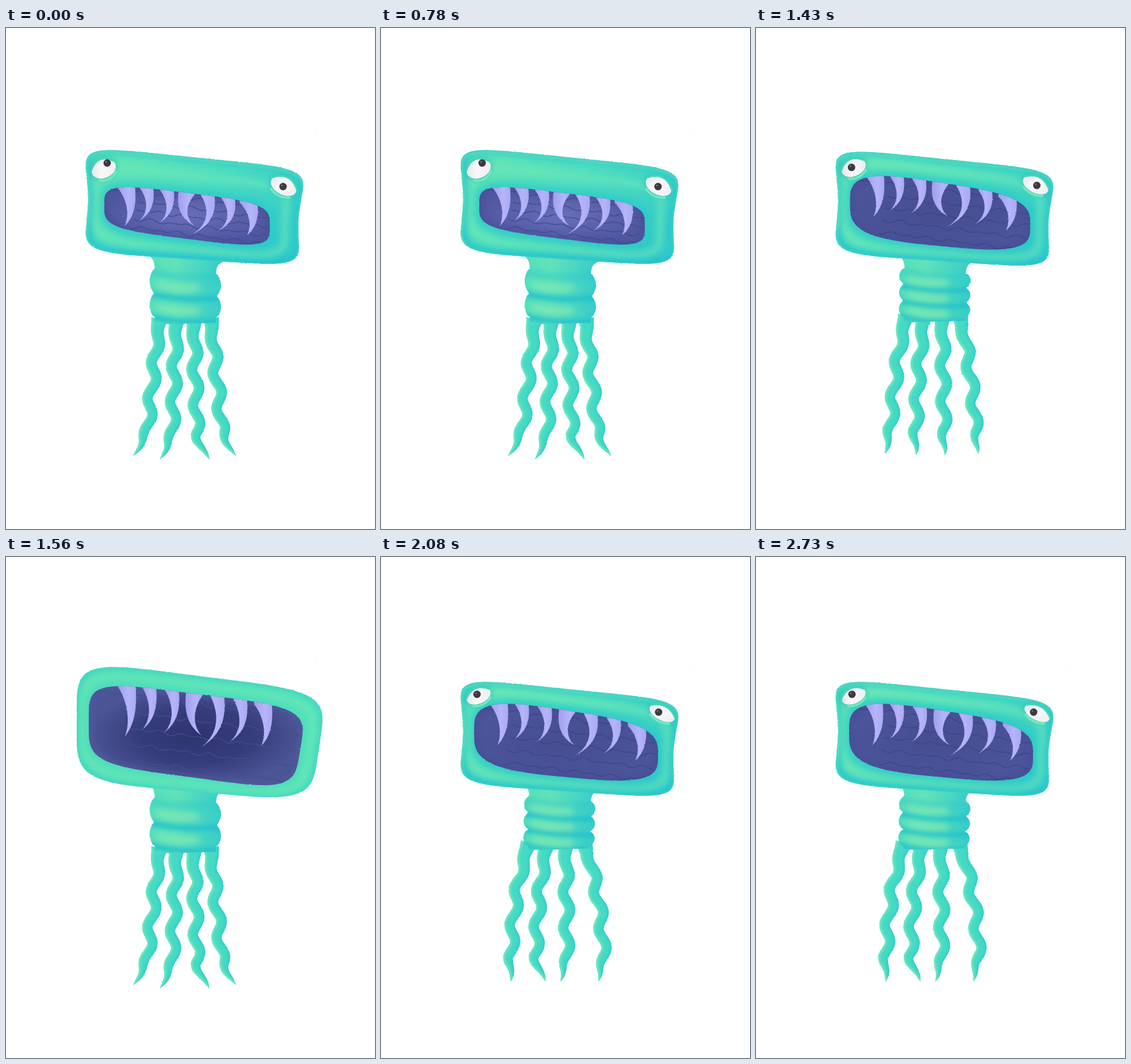
Recreate the animation shown at these times as an HTML page. Size 642 by 872 pixels, loop 2.86 s.

```html
<!DOCTYPE html>
<html lang="en">
<head>
<meta charset="utf-8">
<title>Monster</title>
<style>
html, body { margin: 0; width: 100%; height: 100%; overflow: hidden; background: #fff; }
svg { display: block; width: 100%; height: 100%; }
</style>
</head>
<body>
<svg viewBox="0 0 642 872" xmlns="http://www.w3.org/2000/svg">
  <defs>
    <filter id="rough" filterUnits="userSpaceOnUse" x="0" y="0" width="642" height="872" color-interpolation-filters="sRGB">
      <feTurbulence type="fractalNoise" baseFrequency=".45" numOctaves="1" seed="4"/>
      <feDisplacementMap in="SourceGraphic" scale="2.4" xChannelSelector="R" yChannelSelector="G"/>
    </filter>
    <filter id="soft" filterUnits="userSpaceOnUse" x="0" y="0" width="642" height="872" color-interpolation-filters="sRGB"><feGaussianBlur stdDeviation="6"/></filter>
    <filter id="fine" filterUnits="userSpaceOnUse" x="0" y="0" width="642" height="872" color-interpolation-filters="sRGB"><feGaussianBlur stdDeviation="2"/></filter>
    <linearGradient id="skin" x1="0" y1="0" x2="1" y2=".6">
      <stop offset="0" stop-color="#69e7b4"/><stop offset=".5" stop-color="#50dfbf"/><stop offset="1" stop-color="#34cdca"/>
    </linearGradient>
    <linearGradient id="rim" x1="0" y1="0" x2="1" y2=".3">
      <stop offset="0" stop-color="#56e0ba"/><stop offset="1" stop-color="#56e3bb"/>
    </linearGradient>
    <linearGradient id="trunk">
      <stop offset="0" stop-color="#4fdfbd"/><stop offset=".4" stop-color="#62e2b9"/><stop offset="1" stop-color="#2cc8ce"/>
    </linearGradient>
    <linearGradient id="fang">
      <stop offset="0" stop-color="#a09fee"/><stop offset=".6" stop-color="#b6b5fa"/><stop offset="1" stop-color="#a9a9f4"/>
    </linearGradient>
    <linearGradient id="ball" x2="1" y2=".3">
      <stop offset="0" stop-color="#e2e0e4"/><stop offset=".5" stop-color="#f8f7f9"/><stop offset="1" stop-color="#f1eff2"/>
    </linearGradient>
    <radialGradient id="maw0"><stop offset="0" stop-color="#686eb8"/><stop offset="1" stop-color="#5058a0"/></radialGradient>
    <radialGradient id="maw1"><stop offset="0" stop-color="#464d91"/><stop offset="1" stop-color="#4c549a"/></radialGradient>
    <radialGradient id="maw2"><stop offset="0" stop-color="#2d346f"/><stop offset=".55" stop-color="#363d7b"/><stop offset="1" stop-color="#4c5596"/></radialGradient>
  </defs>
  <g id="art"></g>
</svg>
<script>
const STEP = 130;
const SWAY = { A: 0, D: 1, E: 0.6 };
const LEGS = "ADE".repeat(7) + "D";
const SHUT = 0, HALF = 1, WIDE = 2, OPENS = 9, GAPES = 12, EASES = 16;
const mouthAt = i => i < OPENS ? SHUT : i < GAPES || i >= EASES ? HALF : WIDE;

const mix = (a, b, t) => a + (b - a) * t;
const range = n => Array.from({ length: n }, (_, i) => i);
const r = v => v.toFixed(1);
const SOFT = 'filter="url(#soft)"', FINE = 'filter="url(#fine)"';

function curve(pts, closed) {
  const n = pts.length;
  const at = i => closed ? pts[(i + n) % n] : pts[Math.max(0, Math.min(n - 1, i))];
  let d = "";
  for (let i = 0; i < (closed ? n : n - 1); i++) {
    const [p, q, u, v] = [at(i - 1), at(i), at(i + 1), at(i + 2)];
    d += "C" + [0, 1].map(k => r(q[k] + (u[k] - p[k]) / 6)) + " "
      + [0, 1].map(k => r(u[k] - (v[k] - q[k]) / 6)) + " " + u.map(r);
  }
  return d;
}
const open = pts => "M" + pts[0].map(r) + curve(pts);
const blob = pts => "M" + pts[0].map(r) + curve(pts, true) + "Z";
const fill = (d, paint) => `<path d="${d}" fill="${paint}"/>`;
const line = (d, paint, w, extra = "") =>
  `<path d="${d}" fill="none" stroke="${paint}" stroke-width="${w}" stroke-linecap="round" stroke-linejoin="round" ${extra}/>`;
const clip = (id, d, body) =>
  `<clipPath id="${id}"><path d="${d}"/></clipPath><g clip-path="url(#${id})">${body}</g>`;

// A slab is a sheared superellipse; waist pinches its sides, lean tips its right end.
const slab = (cx, cy, w, h, tilt, power, { waist = 0, lean = 0, taper = 0 } = {}) =>
  ({ cx, cy, w, h, tilt, power, waist, lean, taper });

function slabPath(b) {
  const bend = c => Math.sign(c) * Math.abs(c) ** (2 / b.power);
  return blob(range(80).map(i => {
    const a = i / 80 * 2 * Math.PI, u = bend(Math.cos(a)), v = bend(Math.sin(a));
    return [
      b.cx + b.w * u * (1 - b.waist * (1 - v * v)) - b.lean * v * Math.max(0, u),
      b.cy + b.h * v * (1 - b.taper * u) + b.tilt * b.w * u
    ];
  }));
}
function slabTop(b, x) {
  const u = Math.max(-0.99, Math.min(0.99, (x - b.cx) / b.w));
  return b.cy + b.tilt * b.w * u - b.h * (1 - b.taper * u) * (1 - Math.abs(u) ** b.power) ** (1 / b.power);
}

function pose(kind, s, gape) {
  const drop = 5 * s;
  const head = slab(326, 314 + drop, 199, 89, 0.085, 6, { waist: 0.08, lean: 6, taper: 0.04 });
  if (kind === SHUT) return {
    head, maw: slab(315, 327 + drop, 144, 40, 0.125, 4),
    fang: { x: 209, gap: 35.5, size: 1 },
    eye: { y: drop, open: 16, left: [6, -10], right: [-1, 1] }
  };
  if (kind === HALF) return {
    head, maw: slab(318 + 4 * s, 323 + 2 * s, 152 + 8 * s, 51 + 7 * s, 0.125, 3.4, { taper: 0.08 }),
    fang: { x: 210 - 5 * s, gap: 36 + 4 * s, size: 1 + 0.06 * s },
    eye: { y: -3 * s, open: 17 - 4 * s, left: [-5 + 2 * s, 3 - 6 * s], right: [14 - 20 * s, 5 - 7 * s] }
  };
  return {
    head: slab(334 - 6 * gape, 308, 211 + 6 * gape, 101, 0.107, 5, { lean: 14, taper: 0.05 }),
    maw: slab(328 - 4 * gape, 311, 184 + 4 * gape, 73, 0.13, 4.5, { lean: 12 }),
    fang: { x: 210, gap: 39.5, size: 1.28 }
  };
}

function drawLeg(k, s) {
  const outer = k < 2 ? -1 : 1, inner = k % 3 ? 1 : 0;
  const top = mix(267 + 29.7 * k, 257 + 32 * k, s);
  const foot = mix(241 + 46.5 * k, 226 + 38 * k + 5.3 * k * k, s);
  const flick = mix(20 * outer, 18 * Math.sin(1.9 * k), s);
  const crest = mix(612 + 7 * k, 608 + 3 * k, s);
  const head = mix(506, 498, s), end = mix(745 + 6 * inner, 739, s);
  const n = 28;
  const spine = range(n + 1).map(i => {
    const t = i / n, y = mix(head, end, t), late = Math.max(0, (t - 0.82) / 0.18);
    const drift = mix(t, 1 - (1 - t) ** 2.4, s);
    const wave = 6 * Math.min(1, t * 4) * (1 - late) * Math.cos((y - crest) / 62 * 2 * Math.PI);
    return [mix(top, foot, drift) + wave + flick * late ** 1.3, y];
  });
  const side = sign => spine.map(([x, y], i) => {
    const t = i / n, a = spine[Math.max(0, i - 1)], b = spine[Math.min(n, i + 1)];
    const dx = b[0] - a[0], dy = b[1] - a[1];
    const girth = (20 - 3 * t + 9 * Math.exp(-t * 14)) * Math.min(1, (1 - t) / 0.17) ** 0.7;
    const h = sign * girth / 2 / Math.hypot(dx, dy);
    return [x - dy * h, y + dx * h];
  });
  const left = side(1), right = side(-1);
  const d = open(left) + curve([...right].reverse()) + "Z";
  return fill(d, "#45dac4") + clip("leg" + k, d,
    line(open(right), "#2cc9cd", 6, FINE + ' opacity=".7"') + line(open(left), "#85ebbd", 6, FINE + ' opacity=".8"'));
}

function drawNeck(s) {
  const folds = s > 0.5 ? 3 : 2, top = mix(424, 421, s), tall = mix(80, 82, s), n = 40;
  const side = sign => range(n + 1).map(i => {
    const y = mix(396, mix(516, 510, s), i / n), u = (y - top) / tall;
    const bulge = u > 0 && u < 1 ? 9 * Math.abs(Math.sin(Math.PI * folds * u)) ** 0.6 : 0;
    const half = 53 + bulge + 30 * Math.exp((396 - y) / 6);
    const tilt = 6 * (1 - i / n);
    return [312 - 3 * s + 3 * s * (1 - i / n) + sign * half, y + sign * tilt];
  });
  const d = open(side(-1)) + "L" + curve(side(1).reverse()).slice(1).replace(/^\S+ \S+ /, "") + "Z";
  const bands = range(folds).map(k => {
    const y = top + tall * (k + 1) / folds, mid = y - tall / folds * 0.45;
    return line(`M244 ${r(y - 3)}Q312 ${r(y + 14)} 380 ${r(y + 5)}`, "#22c1cd", 6, FINE + ' opacity=".5"')
      + line(`M244 ${r(y - 3)}Q312 ${r(y + 14)} 380 ${r(y + 5)}`, "#22c1cd", 8, SOFT)
      + line(`M266 ${r(mid)}Q295 ${r(mid + 8)} 330 ${r(mid + 6)}`, "#80e8b4", 10, SOFT);
  }).join("");
  return fill(d, "url(#trunk)") + clip("neck", d,
    line("M250 424Q310 440 380 430", "#2ec8cc", 9, SOFT + ' opacity=".7"') + bands);
}

function drawHead({ head, maw }, wide) {
  const d = slabPath(head), lip = slabPath(maw);
  const between = {};
  for (const key in head) between[key] = mix(head[key], maw[key], 0.5);
  const ring = slabPath(between);
  const shade = wide
    ? line(d, "#30cbc6", 7, SOFT + ' opacity=".8"') + line(ring, "#6be8b6", 9, SOFT + ' opacity=".8"')
      + line(lip, "#42d5c2", 8, SOFT + ' opacity=".6"')
    : line(d, "#1fc0d0", 16, SOFT + ' transform="translate(4 -1)" opacity=".8"')
      + line(lip, "#2bc8c8", 20, SOFT + ' opacity=".7"')
      + line(ring, "#70e8b7", 10, SOFT + ' opacity=".7"')
      + line(d, "#6ce6b8", 6, FINE + ' transform="translate(1 3)" opacity=".5"');
  return fill(d, wide ? "url(#rim)" : "url(#skin)") + clip("head", d, shade);
}

function drawFangs(maw, { x, gap, size }) {
  const leans = [-3, -13, -14, 12, -28, -18, -3];
  return leans.map((lean, k) => {
    const mid = x + gap * k, bow = lean < 0 ? 1 : -1;
    const w = 26 + 5 * Math.cos(k * 2 * Math.PI / 3), len = (k % 4 ? 57 : 68) * size;
    const y = slabTop(maw, mid), outer = mid + bow * w / 2, inner = mid - bow * w / 2;
    const tip = `${r(mid + lean)} ${r(y + len)}`;
    const low = r(y + len * 0.3), deep = r(y + len * 0.72);
    const d = `M${r(inner)} ${r(y - 14)}V${r(y)}C${r(inner + bow * w * 0.55)} ${low} ${r(inner + bow * w * 0.72)} ${deep} ${tip}`
      + `C${r(outer + bow * 2)} ${deep} ${r(outer + bow * 2)} ${low} ${r(outer)} ${r(y)}V${r(y - 14)}Z`;
    return fill(d, "url(#fang)");
  }).join("");
}

function ripples(maw, kind) {
  const rows = 5, d = range(rows).map(row => {
    const v = mix(-0.75, 0.8, row / (rows - 1)), from = maw.cx - maw.w * (0.95 - (row * 0.37) % 0.4);
    return open(range(70).map(i => {
      const x = from + i * maw.w * 1.6 / 70;
      const wave = 3.6 * Math.sin(x / 6.5 + row * 2.3) * Math.sin(x / 31 + row);
      return [x, maw.cy + maw.h * v + maw.tilt * (x - maw.cx) + wave];
    }));
  }).join("");
  return line(d, ["#3f478d", "#3b4384", "#454e8e"][kind], 1.7, 'opacity=".75"');
}

function drawEye(x, y, rx, ry, tilt, [px, py]) {
  const oval = (a, b, more) => `<ellipse rx="${r(a)}" ry="${r(b)}" ${more}/>`;
  return `<g transform="translate(${r(x)} ${r(y)})"><g transform="rotate(${tilt})">`
    + oval(rx + 4, ry + 5, 'fill="#2fc6bd" opacity=".55" style="filter:blur(3px)"')
    + oval(rx, ry, 'fill="url(#ball)"')
    + line(`M${-rx} ${r(-ry * 0.3)}Q0 ${r(-ry * 1.9)} ${rx} ${r(-ry * 0.3)}`, "#48d4b8", 3)
    + line(`M${r(-rx * 0.7)} ${r(ry * 0.95)}Q0 ${r(ry * 1.6)} ${r(rx * 0.8)} ${r(ry * 0.85)}`, "#74e8bd", 4)
    + `</g><circle cx="${r(px)}" cy="${r(py)}" r="6.5" fill="#3c3a3e"/>`
    + `<circle cx="${r(px - 2)}" cy="${r(py - 2)}" r="1.5" fill="#77757a"/></g>`;
}

function scene(i) {
  const s = SWAY[LEGS[i]], kind = mouthAt(i);
  const p = pose(kind, s, (i - GAPES) / (EASES - 1 - GAPES));
  const lip = slabPath(p.maw), e = p.eye;
  return `<g filter="url(#rough)">`
    + range(4).map(k => drawLeg(k, s)).join("")
    + drawNeck(s) + drawHead(p, kind === WIDE)
    + fill(lip, `url(#maw${kind})`)
    + clip("maw", lip, line(lip, kind === WIDE ? "#555fa0" : "#434b92", 8, SOFT + ' opacity=".7"')
      + ripples(p.maw, kind) + drawFangs(p.maw, p.fang))
    + `</g>`
    + (e ? drawEye(170, 245 + e.y, 22, e.open, -24, e.left)
      + drawEye(483 + (kind === HALF ? 6 * s : 0), 275 + e.y, 24, e.open - 1, 28, e.right) : "")
    + `<circle cx="539.5" cy="${r(185 + 6 * s)}" r=".8" fill="#e6e6e6"/>`;
}

const art = document.getElementById("art");
let shown = -1;
function update(t) {
  const i = Math.floor(t / STEP) % LEGS.length;
  if (i !== shown) art.innerHTML = scene(shown = i);
}
const start = performance.now();
function tick() {
  update(performance.now() - start);
  requestAnimationFrame(tick);
}
tick();
</script>
</body>
</html>
```
